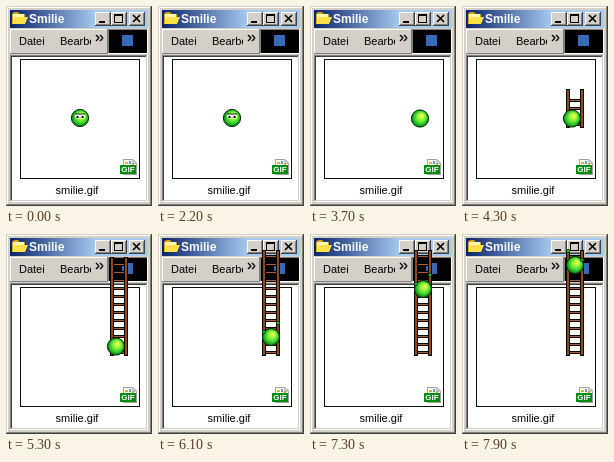
Recreate the animation shown at these times as an HTML page with a canvas. Size 146 by 200 pixels, loop 8 s.

```html
<!DOCTYPE html>
<html lang="de">
<head>
<meta charset="utf-8">
<style>
html, body { margin: 0; width: 146px; height: 200px; overflow: hidden; background: #d4d0c8; }
canvas { display: block; }
</style>
</head>
<body>
<canvas id="stage" width="146" height="200"></canvas>
<script>
const g = document.getElementById('stage').getContext('2d');
const LOOP = 8000;
const FACE = '#d4d0c8';
const clamp = (v, lo, hi) => Math.max(lo, Math.min(hi, v));

function box(x, y, w, h, color) {
  g.fillStyle = color;
  g.fillRect(x, y, w, h);
}

function bevel(x, y, w, h, light, dark, fill) {
  box(x, y, w, h, dark);
  box(x, y, w - 1, h - 1, light);
  box(x + 1, y + 1, w - 2, h - 2, fill);
}

function label(str, x, y, font, color, align = 'left') {
  g.font = font + ' "Liberation Sans", Arial, sans-serif';
  g.fillStyle = color;
  g.textAlign = align;
  g.fillText(str, x, y);
}

function disc(x, y, rx, ry, fill, stroke) {
  g.beginPath();
  g.ellipse(x, y, rx, ry, 0, 0, 7);
  g.fillStyle = fill;
  g.fill();
  if (stroke) {
    g.strokeStyle = stroke;
    g.lineWidth = 1;
    g.stroke();
  }
}

function shape(points, fill) {
  g.beginPath();
  points.forEach(([x, y]) => g.lineTo(x, y));
  g.closePath();
  g.fillStyle = fill;
  g.fill();
}

function lines(points, color, width = 1) {
  g.beginPath();
  points.forEach(([x1, y1, x2, y2]) => { g.moveTo(x1, y1); g.lineTo(x2, y2); });
  g.strokeStyle = color;
  g.lineWidth = width;
  g.stroke();
}

function titleBar() {
  // the blend ends where the buttons begin
  const blue = g.createLinearGradient(4, 0, 90, 0);
  blue.addColorStop(0, '#0a246a');
  blue.addColorStop(1, '#a6caf0');
  box(4, 4, 138, 18, blue);
  // folder
  shape([[6, 8], [8, 6], [12, 6], [14, 8], [19, 8], [19, 18], [6, 18]], '#d0a010');
  box(7, 8, 11, 9, '#fff8b0');
  shape([[9, 11], [22, 11], [19, 18], [6, 18]], '#ffe048');
  label('Smilie', 23, 17, 'bold 12px', '#fff');
  for (const x of [89, 105, 123]) {
    bevel(x, 6, 16, 14, '#fff', '#404040', FACE);
    bevel(x + 1, 7, 14, 12, FACE, '#808080', FACE);
  }
  box(93, 15, 6, 2, '#000');
  box(108, 8, 9, 9, '#000');
  box(109, 10, 7, 6, FACE);
  lines([[127, 9, 134, 16], [134, 9, 127, 16]], '#000', 1.7);
}

function menuBar() {
  bevel(4, 23, 98, 25, '#fff', '#808080', FACE);
  label('Datei', 13, 39, '11px', '#000');
  g.save();
  g.beginPath();
  g.rect(50, 26, 35, 20);
  g.clip();
  label('Bearbeiten', 54, 39, '11px', '#000');
  g.restore();
  for (const x of [90, 94]) {
    lines([[x, 29, x + 3, 32], [x + 3, 32, x, 35]], '#000', 1.4);
  }
  bevel(102, 23, 40, 25, '#808080', '#fff', '#000');
  box(116, 29, 11, 11, '#3868b8');
}

function fileIcon() {
  shape([[117, 153], [127, 153], [131, 157], [131, 169], [117, 169]], '#a0a0a0');
  shape([[118, 154], [126, 154], [130, 158], [130, 168], [118, 168]], '#fff');
  shape([[126, 153], [131, 158], [126, 158]], '#c8c8c8');
  box(119, 156, 3, 2, '#e8b020');
  box(123, 155, 2, 3, '#50a0d0');
  box(126, 157, 2, 2, '#e0a030');
  box(114, 159, 16, 9, '#008a10');
  label('GIF', 122, 166, 'bold 8px', '#fff', 'center');
}

function desktop() {
  bevel(0, 0, 146, 200, FACE, '#404040', FACE);
  bevel(1, 1, 144, 198, '#fff', '#808080', FACE);
  titleBar();
  menuBar();
  bevel(4, 49, 138, 147, '#808080', '#fff', '#fff');
  bevel(5, 50, 136, 145, '#404040', FACE, '#fff');
  g.strokeStyle = '#101010';
  g.lineWidth = 1;
  g.strokeRect(14.5, 53.5, 119, 119);
  fileIcon();
  label('smilie.gif', 71, 188, '11px', '#000', 'center');
}

function ladder(top) {
  for (let y = 118; y > top + 3; y -= 8) {
    box(107, y - 1, 12, 3, '#000');
    box(107, y, 12, 1, '#a86030');
  }
  for (const x of [104, 118]) {
    box(x, top, 4, 122 - top, '#000');
    box(x + 1, top + 1, 2, 120 - top, '#8c4a20');
  }
}

function ball(x, y) {
  const green = g.createRadialGradient(x + 2, y - 3, 1, x, y, 9);
  green.addColorStop(0, '#e4ff50');
  green.addColorStop(0.4, '#80f038');
  green.addColorStop(0.7, '#28c828');
  green.addColorStop(1, '#006808');
  disc(x, y, 8.6, 8.6, green, '#002800');
}

function eye(x, y, look, closed) {
  if (closed) return lines([[x - 2.2, y, x + 2.2, y]], '#000');
  disc(x, y, 2.4, 2.8, '#fff');
  lines([[x - 2.5, y - 2, x + 2.5, y - 2]], '#002000');
  box(x - 1 + look, y, 2, 2, '#000');
}

function idle(t) {
  ball(74, 112);
  const left = t >= 500 && t < 1500 ? -1 : 0;
  const right = t >= 1000 && t < 1500 ? -1 : 0;
  const closed = t >= 2000 && t < 2200;
  eye(71.5, 110, left, closed);
  eye(76.5, 110, right, closed);
}

function walk(n) {
  const x = 74 + 6 * n;
  const y = n % 2 || n === 6 ? 112.5 : 111;
  ball(x, y);
  if (n < 6) {
    eye(x + 2, y - 4, 0.5, false);
    eye(x + 6, y - 3, 0.5, false);
  }
}

function climb(n) {
  const y = 111 - 8 * n;
  const side = n % 2 ? 1 : -1;
  ball(113, y);
  disc(113 + 7 * side, y - 14, 1.6, 1.6, '#20c828', '#004800');
  disc(113 - 7 * side, y - 5, 1.6, 1.6, '#20c828', '#004800');
}

function draw(t) {
  desktop();
  // moves advance in 200 ms steps, counted from 2700 ms
  const n = Math.floor((t - 2500) / 200);
  if (n < 1) return idle(t);
  if (n > 6) ladder(clamp(107 - 12 * (n - 7), 16, 107));
  if (n < 16) walk(clamp(n, 1, 6));
  else if (n === 16) ball(113, 112.5);
  else climb(n - 17);
}

const start = performance.now();
function tick() {
  draw((performance.now() - start) % LOOP);
  requestAnimationFrame(tick);
}
tick();
</script>
</body>
</html>
```
